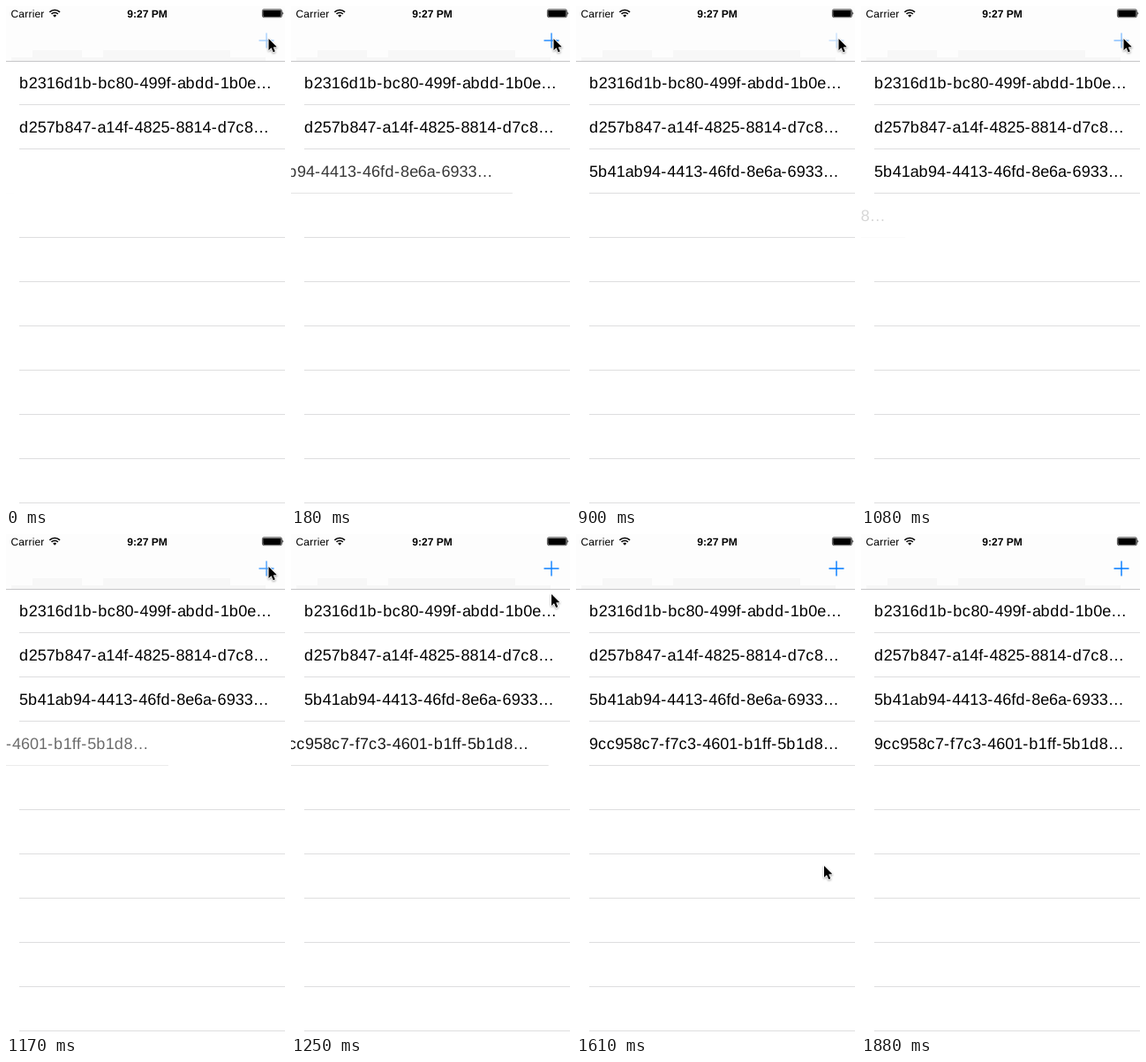
An HTML page for the animation above (2.92 s loop, 316 by 565 pixels).

```html
<!DOCTYPE html>
<html lang="en">
<head>
<meta charset="utf-8">
<title>Item list</title>
<style>
html, body { margin: 0; width: 100%; height: 100%; overflow: hidden; background: #fff; }
svg { display: block; width: 100vw; height: 100vh; }
text {
  font-family: "Liberation Sans", Arial, sans-serif;
  font-variant-ligatures: none;
  text-rendering: geometricPrecision;
}
</style>
</head>
<body>
<svg viewBox="0 0 316 565">
  <rect width="316" height="565" fill="#fff"/>
  <rect width="316" height="62" fill="#fdfdfd"/>
  <path d="M6 62V58H30V50H86V58H110V50H254V58H294V62Z" fill="#f7f7f7"/>
  <rect y="62" width="316" height="1" fill="#c6c6c8"/>

  <text x="5.5" y="13" font-size="12" letter-spacing=".2">Carrier</text>
  <text x="160" y="13" font-size="12" font-weight="bold" text-anchor="middle">9:27 PM</text>
  <g fill="none" stroke="#000" stroke-width="1.6">
    <path d="M49.4 6.9A8.2 8.2 0 0 1 61 6.9"/>
    <path d="M51.5 9A5.2 5.2 0 0 1 58.9 9"/>
    <path d="M55.2 12.7L53.2 10.7A2.9 2.9 0 0 1 57.2 10.7Z" fill="#000" stroke="none"/>
  </g>
  <rect x="290.4" y="3.9" width="22" height="8.8" rx="1.6" fill="none" stroke="#000" stroke-width=".7"/>
  <rect x="291.2" y="4.7" width="20.4" height="7.2" rx=".8"/>
  <path d="M313.4 6.6Q315.2 8.3 313.4 10Z"/>

  <g id="list"></g>
  <path id="plus" d="M286.5 39H303.5M295 30.5V47.5" stroke="#007aff" stroke-width="1.4"/>
  <g id="cursor">
    <path id="arrow" d="M0 0V13L3 10.2L5.2 15.2L7.3 14.3L5.2 9.4L9.3 9.2Z"
      stroke="#fff" stroke-width="1.6" paint-order="stroke" stroke-linejoin="round"
      style="filter: drop-shadow(0 1px 1px rgba(0,0,0,.35))"/>
  </g>
</svg>
<script>
const LOOP = 2920, WIDTH = 320, ROW = 50, TOP = 62, SLIDE = 300;
const STEPS = [0, 90, 180, 270, 900, 1080, 1170, 1250, 1340, 1430, 1520, 1610, 1700, 1790, 1880];
// Extra advance per letter, in px at 18px
const EXTRA = { '-': 1, b: .67, d: .67, c: .67, a: -.34, e: -.34, f: .32 };
// Time, x and y of the pointer tip
const POINTER = [
  [0, 297.5, 37], [1170, 297.5, 37], [1250, 295, 68], [1340, 288.5, 137.5],
  [1520, 282.5, 283], [1610, 281, 375], [1700, 275, 458], [1790, 267, 537]
];
const ROWS = [
  { label: 'b2316d1b-bc80-499f-abdd-1b0e…' },
  { label: 'd257b847-a14f-4825-8814-d7c8…' },
  { label: '5b41ab94-4413-46fd-8e6a-6933…', start: -30, shown: 0 },
  { label: '9cc958c7-f7c3-4601-b1ff-5b1d8…', start: 1005, shown: 1080 }
];

const $ = id => document.getElementById(id);

function add(parent, tag, attrs) {
  const el = document.createElementNS('http://www.w3.org/2000/svg', tag);
  for (const key in attrs) el.setAttribute(key, attrs[key]);
  return parent.appendChild(el);
}

const addLine = (parent, i) => add(parent, 'rect', {
  x: 15, y: TOP + ROW * (i + 1) - 1, width: WIDTH - 15, height: 1, fill: '#dededf'
});

const list = $('list');
for (let i = 0; i < 10; i++) {
  const row = ROWS[i];
  if (!row) { addLine(list, i); continue; }
  if (row.shown > 0) row.blank = addLine(list, i);
  row.el = add(list, 'g', {});
  addLine(row.el, i);
  const chars = [...row.label];
  add(row.el, 'text', {
    x: 15, y: TOP + ROW * i + 31, 'font-size': 18,
    dx: chars.map((c, k) => k ? EXTRA[chars[k - 1]] || 0 : 0).join(' ')
  }).textContent = row.label;
}

const clamp = v => Math.max(0, Math.min(1, v));
const ease = v => v * v * (3 - 2 * v);
const show = (el, on) => el.setAttribute('visibility', on ? 'visible' : 'hidden');

function pointerAt(t) {
  const i = POINTER.findIndex(p => p[0] > t);
  if (i < 0) return POINTER[POINTER.length - 1].slice(1);
  const a = POINTER[i - 1], b = POINTER[i];
  const k = (t - a[0]) / (b[0] - a[0]);
  return [a[1] + (b[1] - a[1]) * k, a[2] + (b[2] - a[2]) * k];
}

function plusAlpha(t) {
  if (t >= 900 && t < 1080) return .2;
  const start = t < 900 ? ROWS[2].start : ROWS[3].start;
  return Math.min(1, .25 + .85 * clamp((t - start) / SLIDE));
}

function draw(time) {
  const t = STEPS.filter(s => s <= time).pop();
  for (const row of ROWS) {
    if (row.start === undefined) continue;
    const p = ease(clamp((t - row.start) / SLIDE));
    row.el.setAttribute('transform', `translate(${((p - 1) * WIDTH).toFixed(2)} 0)`);
    row.el.setAttribute('opacity', p.toFixed(3));
    show(row.el, t >= row.shown);
    if (row.blank) show(row.blank, t < row.shown);
  }
  $('plus').setAttribute('opacity', plusAlpha(t).toFixed(3));
  $('cursor').setAttribute('transform', `translate(${pointerAt(t).join(' ')})`);
  show($('cursor'), t < 1880);
}

const begin = performance.now();
function tick() {
  draw((performance.now() - begin) % LOOP);
  requestAnimationFrame(tick);
}
tick();
</script>
</body>
</html>
```
